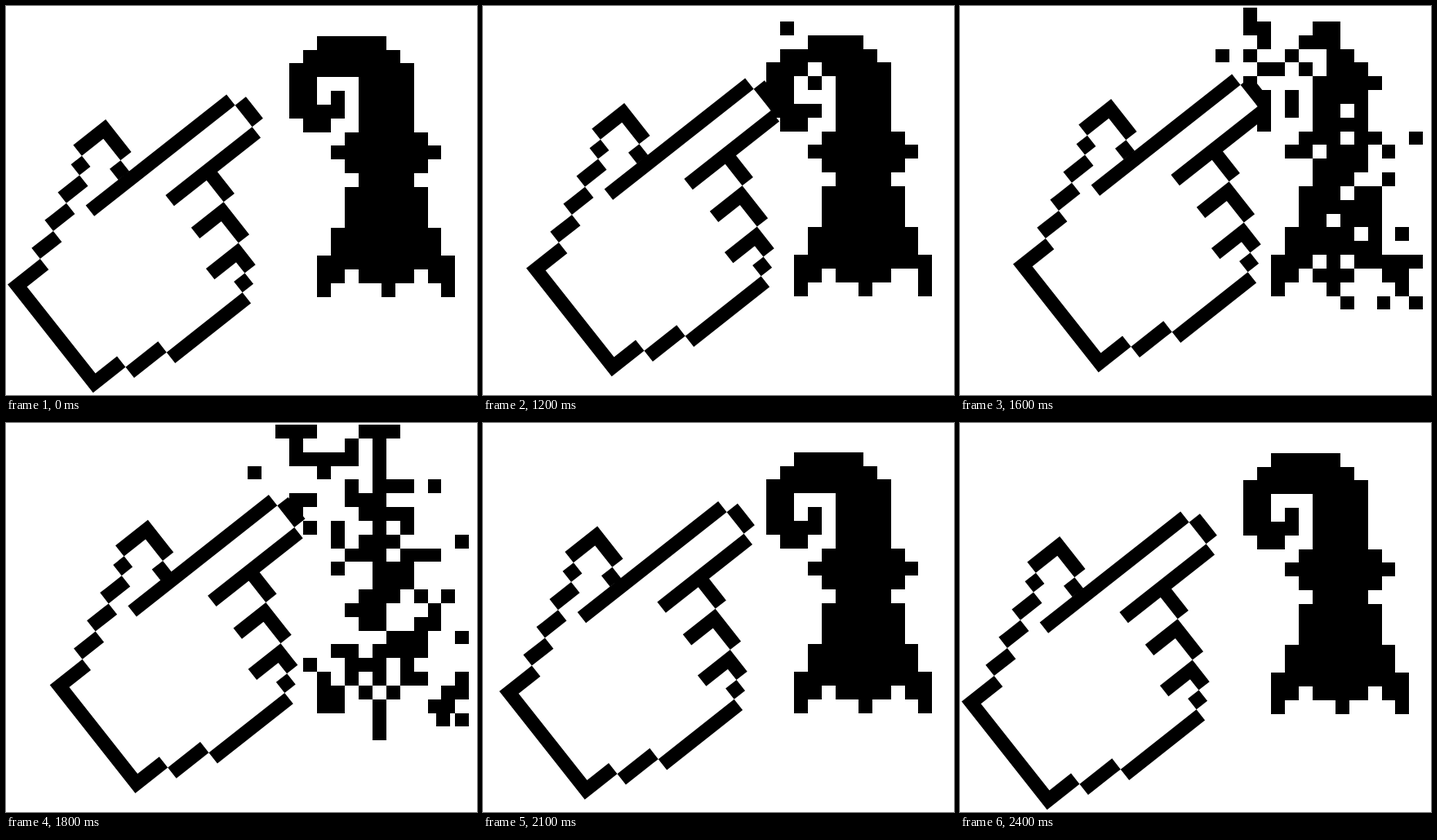
Recreate the animation shown at these times as an HTML page with a canvas. Size 577 by 477 pixels, loop 7400 ms.

```html
<!DOCTYPE html>
<html lang="en">
<head>
<meta charset="utf-8">
<title>Pointing hand and crumbling crozier</title>
<style>
html, body { margin: 0; width: 100%; height: 100%; overflow: hidden; background: #fff; }
canvas { display: block; }
</style>
</head>
<body>
<canvas width="577" height="477"></canvas>
<script>
const ctx = document.querySelector("canvas").getContext("2d");
const LOOP = 7400, STEP = 100, CELL = 16.9, TILT = -0.668;

// All shapes are drawn in units of one cell. Hand paths run through cell centres.
const handBody = new Path2D(
  "M0 0L9-4L10-5H12V-3L11-2V-1H20L21 0V1L20 2H16V4L15 5V7L14 8V9L12 11H6L3 9H0Z");
const handLines = new Path2D(
  "M2 0H0V9H2M3-1H4M5-2H6M7-3H8M9-4h.01M10-5H12V-3M11-2h.01M8-1H20M21 0V1" +
  "M20 2H13M16 3V4M13 5H15V7M12 8H14V9M13 10h.01M12 11H6M5 10H3");
const crozier = new Path2D(
  "M2 0H7V1H8V2H9V7H10V8H11V9H10V10H9V11H10V14H11V16H12V19H11V18H10V17H9V18H8V19" +
  "H7V18H5V17H4V18H3V19H2V16H3V14H4V11H5V10H4V9H3V8H4V7H5V3H2V5H3V4H4V6H3V7H1V6H0V2H1V1H2Z");

let seed = 11;
function random() {
  seed = (seed * 16807) % 2147483647;
  return seed / 2147483647;
}

// Blocks near the core and under the fingertip hold longest; the rest fly outward.
function makeBlock(col, row) {
  const fromCore = Math.hypot((col - 6.5) / 5, (row - 12) / 12);
  const fromTip = Math.hypot(col - 0.5, row - 4) / 3;
  const grip = 0.7 * (1 - Math.min(fromCore, fromTip));
  return {
    col, row,
    hold: Math.max(0.05, random() * 2.2 + grip),
    angle: Math.atan2(row - 11, col - 6) + (random() - 0.5) * 2.5
  };
}

const blocks = [];
for (let row = 0; row < 19; row++) {
  for (let col = 0; col < 12; col++) {
    if (ctx.isPointInPath(crozier, col + 0.5, row + 0.5)) blocks.push(makeBlock(col, row));
  }
}

// Piecewise linear values through [time, ...values] keys
function track(t, keys) {
  const next = keys.findIndex(key => key[0] > t);
  if (next < 1) return keys.at(next).slice(1);
  const from = keys[next - 1], to = keys[next];
  const k = (t - from[0]) / (to[0] - from[0]);
  return from.slice(1).map((value, i) => value + (to[i + 1] - value) * k);
}

const push = [[900, 0, 0], [1000, 16, -7.5], [1200, 51, -20], [1600, 63, -25],
  [1800, 51.7, -20.3], [2100, 18, -12.5], [2400, 0, 0]];
const burst = [[1100, 0], [1200, 0.17], [1600, 1], [1800, 1.5], [2100, 0]];

function drawCrozier(t) {
  const [force] = track(t, burst);
  const top = t >= 1200 && t < 2400 ? 35.75 : 36.75;
  const px = col => Math.round(347.2 + col * 16.93);
  const py = row => Math.round(top + row * 16.83);
  ctx.fillStyle = "#000";
  for (const b of blocks) {
    const reach = force > b.hold ? 1 + (force - b.hold) * 2.5 : 0;
    const col = Math.min(12, b.col + Math.round(Math.cos(b.angle) * reach));
    const row = Math.max(-2, b.row + Math.round(Math.sin(b.angle) * reach));
    // The middle foot sits a little left of the grid
    const x = px(col) - (b.col === 7 && b.row === 18 ? 6 : 0);
    ctx.fillRect(x, py(row), px(col + 1) - px(col), py(row + 1) - py(row));
  }
}

function drawHand(t) {
  const [x, y] = track(t, push);
  ctx.save();
  ctx.translate(2 + x, 341.5 + y);
  ctx.rotate(TILT);
  ctx.scale(CELL, CELL);
  ctx.translate(0.5, 0.5);
  ctx.fillStyle = "#fff";
  ctx.fill(handBody);
  ctx.lineWidth = 1;
  ctx.lineCap = "square";
  ctx.stroke(handLines);
  ctx.restore();
}

function frame(now) {
  const t = Math.floor((now % LOOP) / STEP) * STEP;
  ctx.fillStyle = "#fff";
  ctx.fillRect(0, 0, 577, 477);
  drawCrozier(t);
  drawHand(t);
  requestAnimationFrame(frame);
}
frame(performance.now());
</script>
</body>
</html>
```
